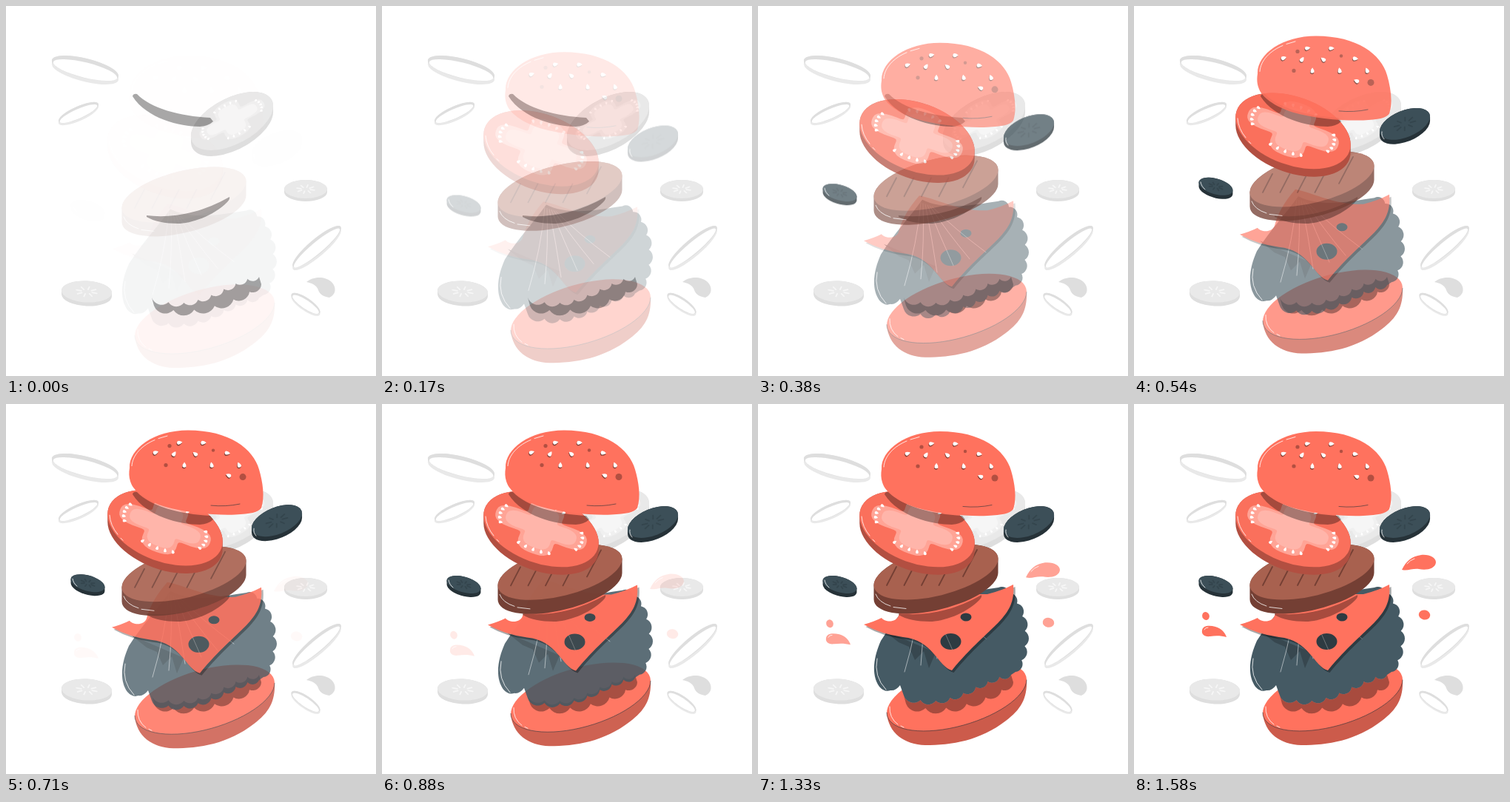
An HTML page for the animation above (1.62 s loop, 500 px wide and 500 px high).

```html
<!DOCTYPE html>
<html lang="en">
<head>
<meta charset="utf-8">
<title>Burger</title>
<style>
  html, body { margin: 0; width: 100%; height: 100%; overflow: hidden; background: #fff; }
  svg { display: block; width: 100%; height: 100%; }
</style>
</head>
<body>
<svg id="stage" viewBox="0 0 500 500" fill="none" stroke-linecap="round" stroke-linejoin="round"></svg>
<script>
const CORAL = '#ff725e', CRUST = '#cc5b4b', DEEP = '#b24f41', INK = '#263238', LEAF = '#455a64', SEAR = '#743f34';
const GREY = '#dedede', PALE = '#e9e9e9', MIST = '#f6f6f6';

const times = (n, make) => Array.from({ length: n }, (_, i) => make(i)).join('');
const path = (d, fill) => `<path d="${d}" fill="${fill}" fill-rule="evenodd"/>`;
const shade = (d, extra = '') => `<path d="${d}" opacity=".34" fill="#000" ${extra}/>`;
const line = (d, color = '#fff', width = 0.8) => `<path d="${d}" stroke="${color}" stroke-width="${width}"/>`;
const place = (x, y, rot, art) => `<g transform="translate(${x} ${y}) rotate(${rot})">${art}</g>`;
const oval = (x, y, rx, ry, rot, fill) => place(x, y, rot, `<ellipse rx="${rx}" ry="${ry}" fill="${fill}"/>`);
const seed = (x, y, rot, size, fill = '#fff') =>
  place(x, y, rot, `<path d="M-5 0Q-1 -3.6 2.5 -3Q5.5 0 2.5 3Q-1 3.6 -5 0z" transform="scale(${size})" fill="${fill}"/>`);

// A tilted slice: an ellipse pushed straight down by its depth.
function disc(x, y, rx, ry, rot, depth, face, rim) {
  const a = rot * Math.PI / 180, s = Math.sin(a), c = Math.cos(a);
  const w = Math.hypot(rx * c, ry * s), dy = (rx * rx - ry * ry) * s * c / w;
  const arc = `A${rx} ${ry} ${rot} 0 1 `;
  return path(`M${x - w} ${y - dy}${arc}${x + w} ${y + dy}v${depth}${arc}${x - w} ${y - dy + depth}z`, rim)
    + oval(x, y, rx, ry, rot, face);
}

const ring = (x, y, rx, ry, rot, depth) =>
  disc(x, y, rx, ry, rot, depth, GREY, PALE)
  + oval(x, y + depth / 2, rx - 1.8, ry - depth / 2 - 0.5, rot, '#fff');

function pickle(x, y, rx, ry, rot, depth, face, rim, mark) {
  const petals = times(8, i => {
    const a = (i + 0.3) * Math.PI / 4, px = rx * Math.cos(a), py = ry * Math.sin(a);
    return `M${px * 0.22} ${py * 0.22}L${px * 0.42} ${py * 0.46}`;
  });
  return disc(x, y, rx, ry, rot, depth, face, rim) + place(x, y, rot, line(petals, mark, 1.8));
}

// Four-lobed pulp with a fan of five seeds at the end of each lobe.
function tomatoSlice(x, y, rx, ry, rot, depth, [face, rim, pulp, heart]) {
  const lobes = scale => 'M' + times(72, i => {
    const a = i * Math.PI / 36, r = scale * (1 - 0.45 * Math.sin(2 * a) ** 4);
    return `${i ? 'L' : ''}${rx * r * Math.cos(a)} ${ry * r * Math.sin(a)}`;
  }) + 'z';
  const seeds = times(20, i => {
    const a = (Math.floor(i / 5) * 90 + (i % 5 - 2) * 11) * Math.PI / 180;
    const px = rx * 0.72 * Math.cos(a), py = ry * 0.68 * Math.sin(a);
    return seed(px, py, Math.atan2(py, px) * 180 / Math.PI, rx / 130);
  });
  return disc(x, y, rx, ry, rot, depth, face, rim)
    + place(x, y - 2, rot, path(lobes(0.8), pulp) + path(lobes(0.62), heart) + seeds);
}

// Scalloped edge: n round lobes strung along a cubic curve.
function frill([p0, p1, p2, p3], n, sweep) {
  const at = (t, k) => (1 - t) ** 3 * p0[k] + 3 * t * (1 - t) ** 2 * p1[k] + 3 * t * t * (1 - t) * p2[k] + t ** 3 * p3[k];
  return times(n, i => {
    const [x, y, px, py] = [at((i + 1) / n, 0), at((i + 1) / n, 1), at(i / n, 0), at(i / n, 1)];
    const r = Math.hypot(x - px, y - py) * 0.6;
    return `A${r} ${r} 0 0 ${sweep} ${x} ${y}`;
  });
}

const backdrop = ring(107, 84, 46.3, 13.2, 14, 5) + ring(98, 144, 29.4, 8.3, -24, 3)
  + ring(420, 325, 42, 10, -40, 4) + ring(405, 402, 23, 7.5, 34, 2.5)
  + pickle(405, 247.5, 29, 12.5, 0, 4, PALE, GREY, MIST)
  + pickle(109, 386, 34, 14.5, 3, 5, PALE, GREY, MIST)
  + path('M406 373C414 366 430 364 440 373C447 380 446 390 437 394C430 393 424 390 422 384C420 377 412 374 406 373z', GREY)
  + tomatoSlice(305.5, 155.5, 60.7, 31, -28, 8, [PALE, GREY, '#f0f0f0', MIST]);

const base = path('M174 417C176 445 198 460 226 461C262 461 300 455 335 428C355 413 364 398 363 373z', CRUST)
  + oval(268.5, 395, 97.6, 40, -16, CORAL)
  + line('M174 417A97.6 40 -16 0 0 363 373', INK, 0.6)
  + line('M178 409Q177 424 189 433M193 435L197 437');

const leafHem = [[342, 366], [300, 368], [260, 420], [197, 394]];
const leafSide = [[325, 248], [362, 258], [372, 330], [348, 362]];
const shadowHem = [[345, 376], [320, 395], [250, 425], [200, 405]];
const leafShadow = 'M197 394' + frill([...leafHem].reverse(), 8, 0) + 'L345 376' + frill(shadowHem, 6, 1) + 'z';

const lettuce = path('M222 246C255 262 295 252 325 248' + frill(leafSide, 7, 1) + 'L342 366' + frill(leafHem, 8, 1)
    + 'L192 380Q186 388 179 387Q171 390 164 382C152 365 157 340 166 320C185 290 205 270 222 246z', LEAF)
  + path('M170 306L240 336L231 357L224 334L212 346L204 328L190 322z', '#37474f')
  + `<g opacity=".75">${times(6, i => line(`M${220 + i * 3} ${250 + i}Q${215 + i * 10} ${305 - i * 4} ${198 + i * 22} ${362 - i * 9}`, '#fff', 0.7))}</g>`
  + line('M161 344Q156 368 173 386');

const hole = (x, y, rx, ry) => `M${x - rx} ${y}a${rx} ${ry} 0 0 0 ${2 * rx} 0a${rx} ${ry} 0 0 0 ${-2 * rx} 0z`;
const cheeseShape = 'M143 298Q157 294 167 289C170 294 186 297 190 286Q196 262 218 237'
  + 'C250 244 270 258 310 257Q330 252 345 244C349 290 314 297 262 360C244 356 236 318 196 315Q166 311 143 298z';
const cheese = shade(cheeseShape, 'transform="translate(2.5 3)"')
  + path(cheeseShape + hole(260.5, 321, 14, 11) + hole(281, 288, 7.5, 5.5), CORAL);
const pattyShadow = 'M190 283C222 287 262 281 302 258Q303 261 299 265C280 284 250 294 232 294C215 294 200 291 190 285z';

const patty = disc(240.5, 227, 86.2, 32.1, -14, 19, '#a8614f', SEAR)
  + times(4, i => line(`M${187 + i * 23.5} 220l-13 25`, SEAR, 1.8)) + line('M296 197L277 233', SEAR, 1.8)
  + line('M159 257Q163 268 179 273M183 274.5L200 276.5');

const darkPickles = [[366, 159.5, 36, 18, -22, 6], [110.5, 244, 23.7, 10.5, 16, 5]]
  .map(shape => pickle(...shape, '#3c4f58', INK, '#34454d')).join('')
  + line('M335 170Q334 176 338 180M90 238Q91 244 96 248');

const tomato = tomatoSlice(215, 169, 81, 46, 20, 10.5, ['#fa705c', DEEP, '#ffa496', '#ffb5aa'])
  + line('M140 152Q141 166 151 178M155 183L158 186');
const crownShadow = 'M171 122Q172 118 177 119C195 138 235 149 276 151L280 156Q274 162 262 163C235 163 190 152 171 122z';

// One line of sesame: each seed steps along and turns a little further.
const sesame = (n, x, y, dx, rot, turn, sag) => times(n, i => {
  const sx = x + dx * i, sy = y + sag * (sx - 250) ** 2, a = rot + turn * i;
  return seed(sx - 0.5, sy + 1.3, a, 0.85, '#7c3c33') + seed(sx, sy, a, 0.83);
});
const pore = (x, y, r) => oval(x, y, r, r, 0, DEEP);
const crown = path('M167 88C166 62 200 37 246 37C302 37 334 62 342 90C347 107 350 127 345 142C341 148 330 150 310 151'
    + 'C283 152 245 149 214 140C190 132 172 120 168 106C166 100 166 94 167 88z', CORAL)
  + pore(221, 58, 2.6) + pore(280, 64, 2.2) + pore(216, 84, 2.6) + pore(320, 100, 4.5)
  + sesame(4, 202, 52, 32.3, 160, 9, 0.0065) + sesame(2, 227, 69, 29, 125, -85, 0)
  + sesame(3, 241, 84, 37, 92, -12, 0) + sesame(1, 301, 98, 0, 25, 0, 0)
  + line('M170 85C171 70 184 57 201 50M206 48L218 44.5')
  + line('M277 138.5Q297 140.5 316 136.5', INK, 0.6);

const sauce = path('M362 224C368 212 375 206 388 204C400 203 408 208 408 214C407 223 395 225 385 223C376 222 370 226 362 224z'
    + 'M92 306C93 299 102 299 110 301C118 303 123 309 125 315C118 313 110 313 103 314C95 315 91 311 92 306z', CORAL)
  + oval(392.5, 285, 7.8, 6.5, 10, CORAL) + oval(97, 286.5, 4.8, 5.5, -20, CORAL)
  + line('M369 216Q373 211 379 209M95 305Q96 302 100 302');

function bezier(x1, y1, x2, y2) {
  const at = (u, a, b) => 3 * u * (1 - u) ** 2 * a + 3 * u * u * (1 - u) * b + u ** 3;
  return x => {
    if (x <= 0 || x >= 1) return x <= 0 ? 0 : 1;
    let lo = 0, hi = 1;
    for (let i = 0; i < 30; i++) {
      const mid = (lo + hi) / 2;
      if (at(mid, x1, x2) < x) lo = mid; else hi = mid;
    }
    return at(lo, y1, y2);
  };
}
const easeOut = bezier(0, 0, 0.58, 1), easeIn = bezier(0.42, 0, 1, 1), easeInOut = bezier(0.42, 0, 0.58, 1);
const overshoot = bezier(0.36, -0.01, 0.5, 1.38);

// Back to front; parts with an ease rise while fading in.
const layers = [
  { art: backdrop },
  { art: base, ease: easeOut, length: 1.1 },
  { art: shade(leafShadow) },
  { art: lettuce, ease: easeOut, length: 1.3 },
  { art: cheese, ease: easeInOut, length: 1 },
  { art: shade(pattyShadow) },
  { art: patty, ease: easeOut, length: 1 },
  { art: darkPickles, ease: overshoot, length: 0.85 },
  { art: tomato, ease: overshoot, length: 0.85 },
  { art: shade(crownShadow) },
  { art: crown, ease: overshoot, length: 1 },
  { art: sauce, ease: easeIn, length: 1, delay: 0.6 },
];

const stage = document.getElementById('stage');
stage.innerHTML = layers.map(l => `<g>${l.art}</g>`).join('');
layers.forEach((l, i) => { l.node = stage.children[i]; });

const LOOP = 1620, STEPS = 39, FPS = 24, RISE = 30;
const start = performance.now();

function draw() {
  const step = Math.floor((performance.now() - start) % LOOP * STEPS / LOOP);
  const time = (step + 1) / FPS;
  for (const { node, ease, length, delay = 0 } of layers) {
    if (!ease) continue;
    const p = ease((time - delay) / length);
    node.setAttribute('transform', `translate(0 ${RISE * (1 - p)})`);
    node.setAttribute('opacity', Math.min(1, p));
  }
  requestAnimationFrame(draw);
}
draw();
</script>
</body>
</html>
```
